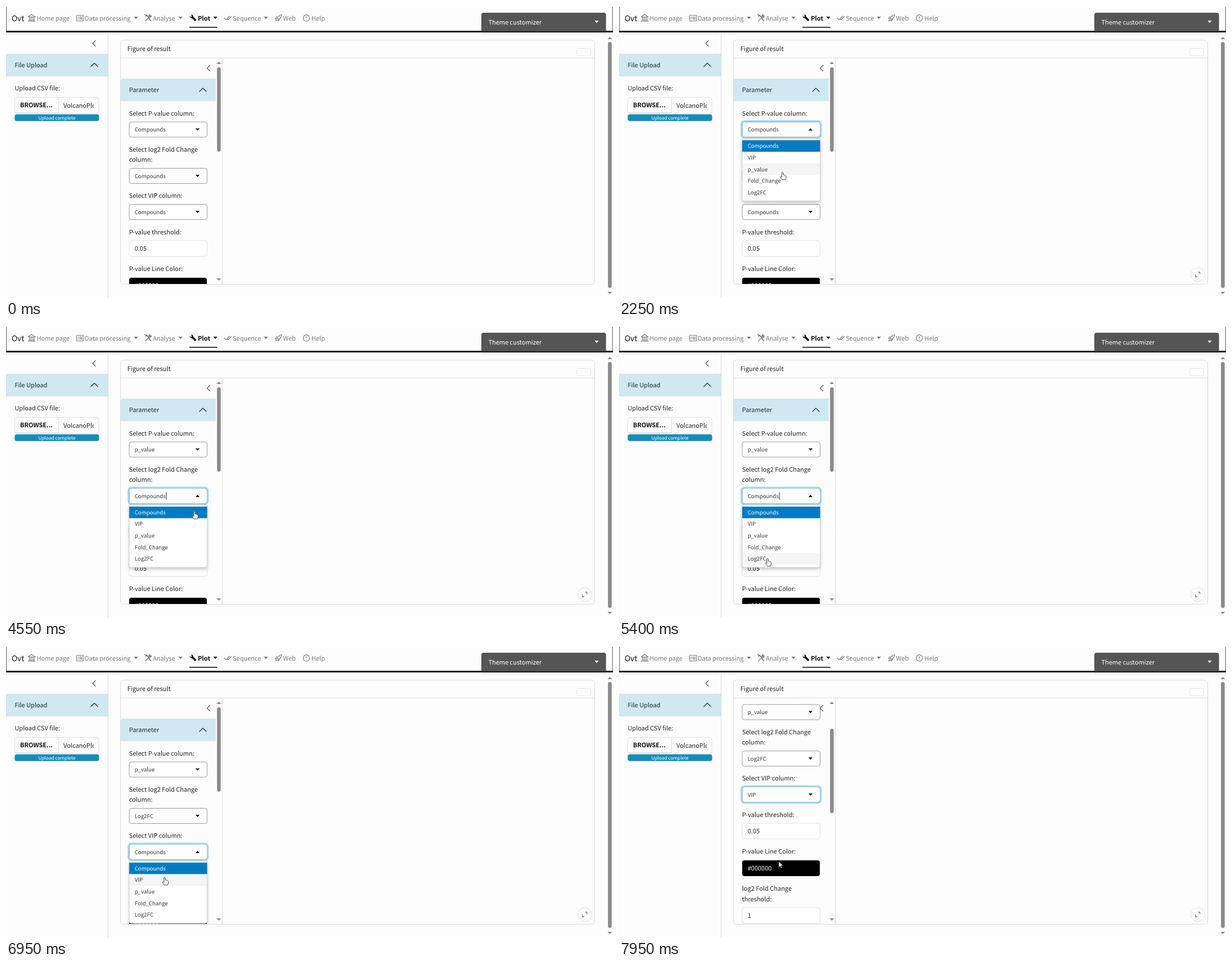
Animation, 1079 px wide and 519 px high, one loop 7.99 s. Source, as an HTML page with a canvas:

```html
<!DOCTYPE html>
<html lang="en">
<head>
<meta charset="utf-8">
<title>Plot settings</title>
<style>
  html, body { margin: 0; width: 100%; height: 100%; overflow: hidden; background: #fdfdfd; }
  canvas { display: block; width: 1079px; height: 519px; }
</style>
</head>
<body>
<canvas id="stage"></canvas>
<script>
const LOOP = 7990, W = 1079, H = 519;
const BG = '#fdfdfd', INK = '#222', MUTED = '#777', LINE = '#dcdcdc', PALE = '#d0e8f2', BLUE = '#007bc2';
const FONT = '"Noto Sans CJK SC", "Noto Sans CJK JP", "Noto Sans CJK", "Noto Sans", sans-serif';
const BASE = 12.3, SMALL = 10.8;

const OPTIONS = ['Compounds', 'VIP', 'p_value', 'Fold_Change', 'Log2FC'];
const ROW = 20.6, LIST_TOP = 19, LIST_END = 127;
const FIELDS = [
  { y: 219.5, open: 1460, pick: 3290, value: 'p_value' },
  { y: 302, open: 4310, pick: 5580, value: 'Log2FC' },
  { y: 366, open: 6240, pick: 7090, value: 'VIP' },
];

// [time, x, y] of the pointer's hot spot
const POINTER = [
  [0, 803, -20], [179, 803, -20], [180, 803, 0], [280, 640, 99], [400, 455, 205],
  [500, 413, 208], [650, 369, 198], [950, 369, 198], [1320, 339, 219], [1830, 339, 219],
  [2050, 316, 262], [2250, 290.5, 295], [2580, 284, 302], [2670, 284, 302], [2850, 281, 305],
  [3140, 272, 293], [3400, 272, 293], [3810, 321, 335], [4070, 339, 310], [4160, 335, 308],
  [4450, 335, 308], [4550, 335, 329], [5070, 266, 418], [5120, 266, 418], [5400, 264, 413],
  [5620, 264, 413], [6100, 329, 365], [6300, 329, 365], [6600, 300, 392], [6950, 282, 411],
  [7150, 282, 411], [7530, 284, 383],
];
const SCROLL = [[7759, 0], [7760, 4.5], [7800, 17], [7850, 45], [7900, 75], [7950, 102]];

const canvas = document.getElementById('stage');
const ctx = canvas.getContext('2d');
const dpr = window.devicePixelRatio || 1;
canvas.width = W * dpr;
canvas.height = H * dpr;

const clamp = v => Math.max(0, Math.min(1, v));
const ramp = (t, start, length = 150) => clamp((t - start) / length);

function follow(keys, t) {
  const i = keys.findIndex(k => k[0] > t);
  if (i === 0) return keys[0].slice(1);
  if (i < 0) return keys[keys.length - 1].slice(1);
  const a = keys[i - 1], b = keys[i], p = (t - a[0]) / (b[0] - a[0]);
  return a.slice(1).map((v, k) => v + (b[k + 1] - v) * p);
}

function text(str, x, middle, { size = BASE, color = INK, bold = false, align = 'left' } = {}) {
  ctx.font = `${bold ? 700 : 400} ${size / 1.117}px ${FONT}`;
  ctx.textRendering = 'geometricPrecision';
  ctx.textAlign = align;
  ctx.fillStyle = color;
  ctx.fillText(str, x, middle + size * 0.33);
}

function rect(x, y, w, h, color) {
  ctx.fillStyle = color;
  ctx.fillRect(x, y, w, h);
}

function box(x, y, w, h, r, fill, stroke, width = 1) {
  ctx.beginPath();
  ctx.roundRect(x, y, w, h, r);
  if (fill) { ctx.fillStyle = fill; ctx.fill(); }
  if (stroke) { ctx.strokeStyle = stroke; ctx.lineWidth = width; ctx.stroke(); }
}

function shape(d, x, y, { fill, stroke, width = 1 } = {}) {
  const path = new Path2D(d);
  ctx.save();
  ctx.translate(x, y);
  ctx.lineCap = ctx.lineJoin = 'round';
  if (fill) { ctx.fillStyle = fill; ctx.fill(path); }
  if (stroke) { ctx.strokeStyle = stroke; ctx.lineWidth = width; ctx.stroke(path); }
  ctx.restore();
}

function clipped(x, y, w, h, paint) {
  ctx.save();
  ctx.beginPath();
  ctx.rect(x, y, w, h);
  ctx.clip();
  paint();
  ctx.restore();
}

const caret = (x, y, color, up) =>
  shape(up ? 'M-3.7 2L0-2L3.7 2z' : 'M-3.7-2L0 2L3.7-2z', x, y, { fill: color });
const chevronUp = (x, y) => shape('M-6 3L0-3L6 3', x, y, { stroke: '#173c49', width: 1.3 });
const chevronLeft = (x, y) => shape('M2.5-5L-2.5 0L2.5 5', x, y, { stroke: '#555', width: 1.2 });

function scrollbar(x, top, bottom, thumbTop, thumbLength) {
  shape('M-4 2L0-2L4 2z', x, top, { fill: '#858585' });
  shape('M-4-2L0 2L4-2z', x, bottom, { fill: '#858585' });
  box(x - 3.2, thumbTop, 6.6, thumbLength, 3.3, '#8b8b8b');
}

function header() {
  rect(0, 0, W, 47, BG);
  rect(0, 2, 1, 43, '#555');
  rect(W - 1, 2, 1, 43, '#555');
  rect(0, 44, W, 3, '#1b1b1f');
  text('Ovt', 10, 22, { size: 15.4, color: '#111' });

  const line = { stroke: MUTED, width: 1.1 };
  shape('M0 4.5L6.5 0L13 4.5zM2.5 5V10M5.2 5V10M7.8 5V10M10.5 5V10M1 10.5H12M0 12.3H13', 39.2, 15, line);
  shape('M1 0H11.500Q12.500 0 12.500 1V9Q12.500 10 11.500 10H1Q0 10 0 9V1Q0 0 1 0M2.500 3H3.500M5.500 3H10.300M2.500 5H3.500M5.500 5H10.300M2.500 7H3.500M5.500 7H10.300', 125.5, 16.5, line);
  shape('M0 0L3 1L8 7M3 1L1 3zM7.5 7.500L10.500 11', 247, 15.500, { stroke: MUTED, width: 1.7 });
  shape('M1 11L8 4M11.300 1.800L9.700 3.400L8.300 2L9.800.400Q7-.500 6.800 2.500L8.200 4.300Q11.500 5 11.300 1.800', 247, 15.500, { stroke: MUTED, width: 1.3 });
  shape('M.5 2.500L2.600 4.500L4.600 2.600L2.700.500Q6.500-.500 6.800 3.700L11.800 8.700Q12.500 11.500 9.600 11.500L4.700 6.500Q.500 6.700.500 2.500z', 326, 15.300, { fill: '#111' });
  shape('M0 6L3 9L9.500 2.500M5.500 8L6.500 9L12.500 3', 388, 15.500, { stroke: MUTED, width: 1.1 });
  shape('M4 7Q6 .500 11.500.500Q11.500 6 5.500 8.500zM4.500 4.500H2L.500 7.500L3.500 7M7.500 7.800V10L5 11.800L5.200 8.500M2.500 9L.500 11.500L3.500 10.500', 478.500, 15, line);
  shape('M8.200 3.200V4.200', 478.500, 15, line);
  ctx.beginPath();
  ctx.arc(534, 21.300, 5.700, 0, 7);
  ctx.strokeStyle = MUTED;
  ctx.lineWidth = 1.1;
  ctx.stroke();
  rect(533.400, 18, 1.300, 4, MUTED);
  rect(533.400, 23.300, 1.300, 1.400, MUTED);

  const items = { 'Home page': 54.5, 'Data processing': 140, 'Analyse': 261, 'Sequence': 403, 'Web': 492.5, 'Help': 543 };
  for (const name in items) text(name, items[name], 21.5, { color: MUTED });
  text('Plot', 341, 21.5, { bold: true, color: '#111' });
  for (const x of [231, 310, 462]) caret(x, 21, MUTED);
  caret(372, 21, '#111');
  rect(326, 37, 49.5, 1.6, '#111');

  const shade = ctx.createLinearGradient(0, 47, 0, 53);
  shade.addColorStop(0, 'rgba(0,0,0,.08)');
  shade.addColorStop(1, 'rgba(0,0,0,0)');
  rect(846, 47, 220, 6, shade);
  box(845.5, 12.5, 220.5, 32, [3, 3, 0, 0], '#555', '#4a4a4a');
  text('Theme customizer', 857.5, 28.5, { color: '#fff' });
  caret(1050, 28, '#fff');
}

function uploadPanel() {
  rect(181, 47, 1, H - 47, LINE);
  chevronLeft(156.5, 66.5);
  rect(0, 85, 181, 40, PALE);
  text('File Upload', 15.4, 105, { color: '#12323d' });
  chevronUp(157, 104.5);
  text('Upload CSV file:', 15.4, 146);
  box(15.5, 162.5, 149.5, 28, 4, BG, '#e2e2e2');
  rect(93, 162, 1, 29, '#dedede');
  rect(17, 189.5, 76, 1.5, '#d4d4d4');
  text('BROWSE...', 25, 176, { bold: true, color: '#111' });
  clipped(94, 163, 62, 27, () => text('VolcanoPlot', 102, 177));
  box(15.5, 192.5, 150, 12, 4, '#158cba');
  text('Upload complete', 90.5, 198.5, { size: 9.25, color: '#fff', align: 'center' });
}

const isOpen = (f, t) => t >= f.open && t < f.pick;

function selectBox(f, i, t) {
  const next = FIELDS[i + 1];
  const focus = ramp(t, f.open) - (next ? ramp(t, next.open) : 0);
  const open = isOpen(f, t);
  const top = f.y - 13.5;
  if (focus > 0) box(217.5, top - 1.5, 141.5, 30, 5.5, null, `rgba(70,165,220,${0.42 * focus})`, 3);
  box(219, top, 138.5, 27, 4, '#fff', '#9a9a9a');
  if (focus > 0) {
    ctx.globalAlpha = focus;
    box(219, top, 138.5, 27, 4, null, '#8ac6dd');
    ctx.globalAlpha = 1;
  }
  text(t < f.pick ? 'Compounds' : f.value, 228.7, f.y, { size: SMALL, color: '#333' });
  if (open && (t - f.open) % 1000 < 500) rect(284.5, f.y - 6.5, 1, 13, '#222');
  caret(340.5, f.y, '#111', open);
}

function optionList(f, x, y) {
  const top = f.y + LIST_TOP;
  ctx.save();
  ctx.shadowColor = 'rgba(0,0,0,.25)';
  ctx.shadowBlur = 6 * dpr;
  ctx.shadowOffsetY = 3 * dpr;
  box(219, f.y + 16, 138.5, LIST_END - 16, [0, 0, 4, 4], '#fff');
  ctx.restore();
  box(219, f.y + 16, 138.5, LIST_END - 16, [0, 0, 4, 4], '#fff', '#d4d4d4');
  OPTIONS.forEach((name, i) => {
    const rowY = top + i * ROW;
    const hover = x > 219 && x < 357 && y >= rowY && y < rowY + ROW;
    if (i === 0) rect(219, rowY, 138.5, ROW, BLUE);
    else if (hover) rect(219.5, rowY, 137.5, ROW, '#f5f5f5');
    text(name, 228.7, rowY + ROW / 2, { size: SMALL, color: i ? '#3a3a3a' : '#fff' });
  });
}

function parameters(t, x, y, scroll) {
  clipped(204, 93, 170, 401, () => {
    ctx.translate(0, -scroll);
    rect(204, 129, 169, 40, PALE);
    text('Parameter', 218.7, 149, { color: '#12323d' });
    chevronUp(350, 149);
    const labels = [
      ['Select P-value column:', 191], ['Select log2 Fold Change', 254.5], ['column:', 273],
      ['Select VIP column:', 337], ['P-value threshold:', 401.5], ['P-value Line Color:', 467],
      ['log2 Fold Change', 533], ['threshold:', 551.5],
    ];
    for (const [label, middle] of labels) text(label, 218.7, middle);
    FIELDS.forEach((f, i) => selectBox(f, i, t));
    box(219, 417, 138.5, 28, 4, '#fff', '#e2e2e2');
    text('0.05', 228.7, 431);
    box(219, 483, 138, 28, 4, '#000');
    text('#000000', 228.7, 497, { color: '#fff' });
    box(219, 567, 138.5, 28, 4, '#fff', '#e2e2e2');
    text('1', 228.7, 581);
    const open = FIELDS.find(f => isOpen(f, t));
    if (open) optionList(open, x, y + scroll);
  });
  chevronLeft(360, 110.5);
  scrollbar(378.3, 101, 486, 109 + scroll * 0.372, 150);
}

function card(t, x, y, scroll) {
  box(203.5, 60.5, 843, 434, 5, BG, LINE);
  text('Figure of result', 215.8, 76);
  rect(204, 92, 842, 1, LINE);
  rect(384, 92, 1, 402, LINE);
  box(1014.5, 75.5, 25, 13, 3, BG, '#e4e4e4');
  parameters(t, x, y, scroll);

  ctx.globalAlpha = ramp(t, 250);
  box(1016.5, 465, 24.5, 24.5, 12.25, '#fff', '#dcdcdc');
  shape('M1 -4H4V-1M-1 4H-4V1', 1028.7, 477.2, { stroke: '#666', width: 1.2 });
  ctx.globalAlpha = 1;
}

const CURSORS = {
  arrow: 'M0 0V10.300L2.400 8.200L4 11.700L5.600 11L4 7.600H7.300z',
  hand: 'M-1.200 1Q0-.800 1.200 1V5Q2.500 4.200 3.200 5.400Q4.700 4.900 5.100 6.200Q6.500 6 6.500 7.500V10Q6.300 12 5.200 13.800H-.600Q-2 11.500-3.600 9.500Q-4.300 7.800-2.800 7.800L-1.200 9.300z',
  beam: 'M-2-5H-.500L0-4.500L.500-5H2M0-4.500V4.500M-2 5H-.500L0 4.500L.500 5H2',
};

function cursorKind(t, x, y) {
  if (x < 219 || x > 357.5) return 'arrow';
  for (const f of FIELDS) {
    const dy = y - f.y, open = isOpen(f, t);
    if (open && dy > 16 && dy < LIST_END) return 'hand';
    if (Math.abs(dy) < 14) return open ? 'beam' : 'hand';
  }
  return 'arrow';
}

function pointer(t, x, y, scroll) {
  const kind = cursorKind(t, x, y + scroll);
  shape(CURSORS[kind], x, y, { fill: kind === 'beam' ? null : '#fff', stroke: '#333', width: 0.9 });
}

function draw(t) {
  const [x, y] = follow(POINTER, t);
  const [scroll] = follow(SCROLL, t);
  ctx.setTransform(dpr, 0, 0, dpr, 0, 0);
  rect(0, 0, W, H, BG);
  header();
  uploadPanel();
  card(t, x, y, scroll);
  scrollbar(1073.3, 57, 510, 64, 437);
  pointer(t, x, y, scroll);
}

const start = performance.now();
function tick() {
  draw((performance.now() - start) % LOOP);
  requestAnimationFrame(tick);
}
tick();
</script>
</body>
</html>
```
